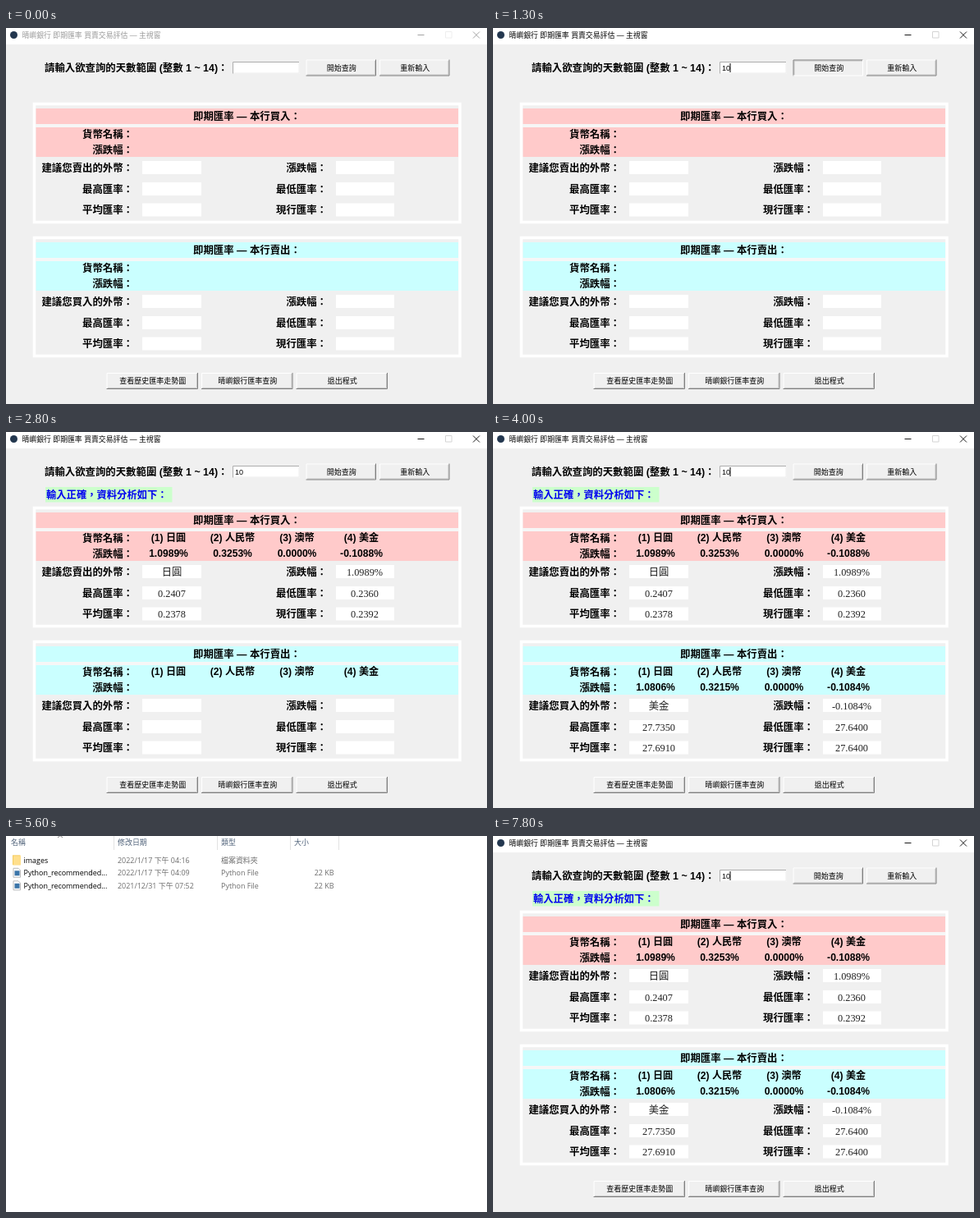
These frames come from a looping animation (586 px wide and 458 px high, 8000 ms). An HTML page:

```html
<!DOCTYPE html>
<html lang="zh-TW">
<head>
<meta charset="utf-8">
<title>即期匯率</title>
<style>
html, body { margin: 0; width: 100%; height: 100%; overflow: hidden; background: #f0f0f0; }
svg { display: block; width: 586px; height: 458px; }
text { white-space: pre; }
.bold { font: bold 12.4px "Liberation Sans", "Noto Sans CJK TC", sans-serif; }
.rate { font: bold 12.1px "Liberation Sans", "Noto Sans CJK TC", sans-serif; }
.note { font: bold 12.3px "Noto Sans CJK JP", sans-serif; }
.ui { font: 9px "Liberation Sans", "Noto Sans CJK TC", sans-serif; }
.title { font: 8.85px "Liberation Sans", "Noto Sans CJK TC", sans-serif; }
.value { font: 12.3px "Liberation Serif", "Noto Sans CJK TC", serif; }
.file { font: 8.95px "Open Sans", "Noto Sans CJK TC", sans-serif; }

.t { animation: 8s step-end infinite; }
.active { animation-name: active; }
.idle { animation-name: idle; }
.one { animation-name: one; }
.ten { animation-name: ten; }
.up { animation-name: up; }
.down { animation-name: down; }
.step1 { animation-name: step1; }
.step2 { animation-name: step2; }
.step3 { animation-name: step3; }
.caret { animation-name: caret; }
.files { animation-name: files; }

@keyframes active { 0%, 68.75% { visibility: hidden } 10%, 96.25%, 100% { visibility: visible } }
@keyframes idle { 0%, 68.75% { visibility: visible } 10%, 96.25%, 100% { visibility: hidden } }
@keyframes one { 0%, 13.75%, 100% { visibility: hidden } 12.5% { visibility: visible } }
@keyframes ten { 0% { visibility: hidden } 13.75%, 100% { visibility: visible } }
@keyframes up { 0%, 33.75%, 100% { visibility: visible } 16.25% { visibility: hidden } }
@keyframes down { 0%, 33.75%, 100% { visibility: hidden } 16.25% { visibility: visible } }
@keyframes step1 { 0% { visibility: hidden } 33.75%, 100% { visibility: visible } }
@keyframes step2 { 0% { visibility: hidden } 35%, 100% { visibility: visible } }
@keyframes step3 { 0% { visibility: hidden } 36.25%, 100% { visibility: visible } }
@keyframes caret {
  0%, 33.75%, 46.25%, 58.75%, 68.75% { visibility: hidden; transform: translateX(8.5px) }
  10% { visibility: visible; transform: none }
  12.5% { visibility: visible; transform: translateX(4.5px) }
  13.75%, 38.75%, 50%, 61.25%, 96.25%, 100% { visibility: visible; transform: translateX(8.5px) }
}
@keyframes files { 0%, 96.25%, 100% { visibility: hidden } 70% { visibility: visible } }
</style>
</head>
<body>
<svg id="stage" viewBox="0 0 586 458"></svg>
<script>
const SIZE = { bold: 12.4, rate: 12.1, note: 12.3, ui: 9, title: 8.85, value: 12.3, file: 8.95 };

const rect = (x, y, w, h, fill) =>
  `<rect x="${x}" y="${y}" width="${w}" height="${h}" fill="${fill}"/>`;
const line = (d, color, width = 1) =>
  `<path d="${d}" fill="none" stroke="${color}" stroke-width="${width}"/>`;
// y is the middle of the text line
const text = (font, x, y, str, anchor = 'start', fill = '#000') =>
  `<text class="${font}" x="${x}" y="${y + SIZE[font] * .37}" text-anchor="${anchor}" fill="${fill}">${str}</text>`;
const timed = (name, content) => `<g class="t ${name}">${content}</g>`;

function button(x, y, w, label, pressed) {
  const h = 20, r = x + w, b = y + h;
  const [topLeft, bottomRight] = pressed ? ['#808080', '#fff'] : ['#fff', '#808080'];
  const d = pressed ? .5 : 0;
  return rect(x, y, w, h, '#f0f0f0') +
    line(pressed ? `M${x + 1.5} ${b - 1}V${y + 1.5}H${r - 1}`
                 : `M${x + 1} ${b - 1.5}H${r - 1.5}V${y + 1}`, '#c4c4c4') +
    line(`M${x + .5} ${b}V${y + .5}H${r}`, topLeft) +
    line(`M${x} ${b - .5}H${r - .5}V${y}`, bottomRight) +
    text('ui', x + w / 2 + .5 + d, y + h / 2 + d, label, 'middle');
}

function titleBar(color, disabled) {
  return text('title', 19.5, 8.5, '晴嶼銀行 即期匯率 買賣交易評估 — 主視窗', 'start', color) +
    line('M501.5 8.5H509.5M569 4.5L577 12.5M577 4.5L569 12.5', color, .9) +
    line('M535.5 4.5H543V12H535.5Z', disabled);
}

const COLS = [198, 276, 354.5, 433];
const NAMES = ['(1) 日圓', '(2) 人民幣', '(3) 澳幣', '(4) 美金'];

function panel(y, p) {
  const label = (x, dy, str) => text('bold', x, y + dy, str, 'end');
  const rows = [79, 105, 130.5];
  const left = [p.advice, '最高匯率：', '平均匯率：'];
  const right = ['漲跌幅：', '最低匯率：', '現行匯率：'];
  const across = (dy, list) =>
    list.map((s, i) => text('rate', COLS[i], y + dy, s, 'middle')).join('');

  let out = `<rect x="34.5" y="${y + 1.5}" width="518.5" height="144" fill="none" stroke="#fff" stroke-width="3.5"/>` +
    rect(36.5, y + 7, 514.5, 19, p.color) +
    rect(36.5, y + 26, 514.5, 4, '#f6f6f6') +
    rect(36.5, y + 30, 514.5, 36, p.color) +
    text('bold', 293.5, y + 16, p.heading, 'middle') +
    label(155, 38, '貨幣名稱：') + label(155, 57, '漲跌幅：');

  rows.forEach((dy, i) => {
    out += label(155, dy, left[i]) + label(391, dy, right[i]) +
      rect(166, y + dy - 8, 72, 16, '#fff') + rect(402, y + dy - 8, 71, 16, '#fff');
  });

  const values = rows.map((dy, i) =>
    text('value', 202, y + dy, p.left[i], 'middle', '#222') +
    text('value', 437, y + dy, p.right[i], 'middle', '#222')).join('');

  return out + timed(p.namesAt, across(38, NAMES)) +
    timed(p.ratesAt, across(57, p.rates)) + timed(p.valuesAt, values);
}

function mainWindow() {
  return rect(0, 0, 586, 458, '#f0f0f0') + rect(0, 0, 586, 20, '#fff') +
    '<circle cx="9.5" cy="8.5" r="4.5" fill="#23374f"/>' +
    timed('idle', titleBar('#999', '#eee')) + timed('active', titleBar('#000', '#d4d4d4')) +
    text('bold', 47, 48, '請輸入欲查詢的天數範圍 (整數 1 ~ 14)：') +
    rect(276, 41, 81.5, 14.5, '#fff') +
    line('M276.5 55.5V41.5H357', '#adadad') +
    line('M277 55H357V42', '#ececec') +
    timed('one', text('ui', 279, 48.5, '1')) +
    timed('ten', text('ui', 279, 48.5, '10')) +
    timed('caret', rect(280, 43, 1, 11, '#000')) +
    timed('up', button(365.5, 38.5, 85.5, '開始查詢')) +
    timed('down', button(365.5, 38.5, 85.5, '開始查詢', true)) +
    button(455, 38.5, 85.5, '重新輸入') +
    timed('step1', rect(48, 67, 154.5, 18.5, '#ccffcc') +
      text('note', 49, 76, '輸入正確，資料分析如下：', 'start', '#0000f0')) +
    panel(91, {
      color: '#ffcaca', heading: '即期匯率 — 本行買入：', advice: '建議您賣出的外幣：',
      rates: ['1.0989%', '0.3253%', '0.0000%', '-0.1088%'],
      left: ['日圓', '0.2407', '0.2378'], right: ['1.0989%', '0.2360', '0.2392'],
      namesAt: 'step1', ratesAt: 'step1', valuesAt: 'step2'
    }) +
    panel(254, {
      color: '#caffff', heading: '即期匯率 — 本行賣出：', advice: '建議您買入的外幣：',
      rates: ['1.0806%', '0.3215%', '0.0000%', '-0.1084%'],
      left: ['美金', '27.7350', '27.6910'], right: ['-0.1084%', '27.6400', '27.6400'],
      namesAt: 'step2', ratesAt: 'step3', valuesAt: 'step3'
    }) +
    button(122.5, 420, 111.5, '查看歷史匯率走勢圖') +
    button(238, 420, 111.5, '晴嶼銀行匯率查詢') +
    button(353.5, 420, 111.5, '退出程式');
}

function fileList() {
  const head = [[6, '名稱'], [136, '修改日期'], [262, '類型'], [351, '大小']];
  const files = [
    ['images', '2022/1/17 下午 04:16', '檔案資料夾', ''],
    ['Python_recommended...', '2022/1/17 下午 04:09', 'Python File', '22 KB'],
    ['Python_recommended...', '2021/12/31 下午 07:52', 'Python File', '22 KB']
  ];
  let out = rect(0, 0, 586, 458, '#fff') +
    line('M63 2L66 -.5L69 2', '#777', .9) +
    line('M131.5 0V17M257.5 0V17M346.5 0V17M405.5 0V17', '#e2e2e2');
  for (const [x, s] of head) out += text('file', x, 7.5, s, 'start', '#53657c');
  files.forEach(([name, date, kind, size], i) => {
    const y = 29.3 + i * 15.5, gray = '#6d6d6d';
    out += i
      ? `<path d="M9 ${y - 5.5}h6l2.5 2.5v8.5h-8.5z" fill="#fff" stroke="#aaa" stroke-width=".8"/>` +
        rect(10.5, y - 2.5, 6, 6, '#3b75a8')
      : rect(8, y - 6, 9.5, 12, '#f5cd62') + rect(9, y - 5, 9, 11, '#ffdf8c');
    out += text('file', 21.5, y, name) +
      text('file', 136, y, date, 'start', gray) +
      text('file', 262, y, kind, 'start', gray) +
      text('file', 399.5, y, size, 'end', gray);
  });
  return out;
}

document.getElementById('stage').innerHTML = mainWindow() + timed('files', fileList());
</script>
</body>
</html>
```
